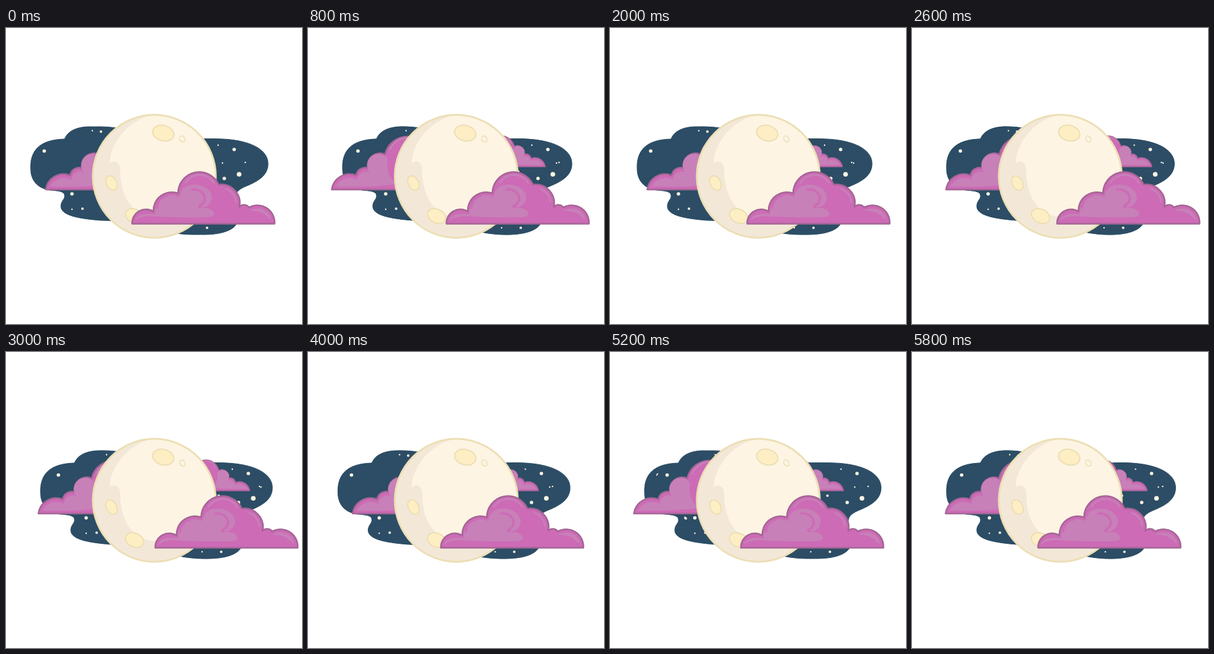
An HTML page that plays this animation: 480x480 px, repeating every 6 s.

```html
<!DOCTYPE html>
<html lang="en">
<head>
<meta charset="utf-8">
<title>Moon and clouds</title>
<style>
  html, body { margin: 0; width: 100%; height: 100%; overflow: hidden; background: #fff; }
  svg { display: block; width: 100%; height: 100%; }
  .night { fill: #2c4d65; stroke: #2c4d65; }
  .cloud { fill: #cd6bb6; stroke: #a46695; stroke-width: 2.6; stroke-linejoin: round; }
  .light { fill: #c780b8; }
  .line { fill: none; stroke: #cd6bb6; stroke-width: 3.5; stroke-linecap: round; }
  .shine { stroke: #c780b8; stroke-width: 3; }
  .stars { fill: none; stroke: #fef4e3; stroke-linecap: round; }
  .crater { fill: #fdeec3; stroke: #ecdfb5; stroke-width: 2; }
</style>
</head>
<body>
<svg viewBox="0 0 480 480">
  <defs>
    <g id="sky">
      <path class="night" d="M40 228C39 200 53 181 95 180C100 167 115 160 136 160C180 160 230 180 309 180C374 177 409 195 409 220C409 239 393 248 377 255C364 260 357 265 356 272C354 290 364 305 359 316C352 330 329 335 304 335C250 335 220 312 154 312C114 309 89 303 89 289C89 280 96 278 95 271C94 264 82 264 72 263C49 260 40 245 40 228Z"/>
      <!-- Zero-length strokes with round caps, one path per size -->
      <g class="stars">
        <path stroke-width="2.4" d="M140 166.500h0M107 294h0M344 190h0M388 218h0M295 324h0"/>
        <path stroke-width="4.200" d="M154 168h0M124 293h0M322 233h0M326 324h0"/>
        <path stroke-width="5.600" d="M62 199.500h0M107 269h0M370 197h0M354 244h0"/>
        <path stroke-width="7.600" d="M378 237.300h0"/>
      </g>
    </g>
    <g id="puff">
      <path class="cloud" d="M.5 262A29 29 0 0 1 40 239A15 15 0 0 1 59 227A20 20 0 0 1 87 205A37 37 0 0 1 160 210V262Z"/>
      <path class="light" d="M7 257A26 26 0 0 1 42 246A14 14 0 0 1 62 234A18 18 0 0 1 91 211Q88 240 106 253Q60 259 7 257Z"/>
      <path class="line shine" d="M95 197A30 30 0 0 1 123 178"/>
    </g>
  </defs>

  <use href="#sky" x="16"/>
  <use href="#sky" id="drift"/>
  <use href="#puff" id="left"/>
  <g id="right">
    <use href="#puff" transform="matrix(-.58 0 0 .58 0 73)"/>
    <path class="stars" stroke-width="2.4" d="M18 219h0"/>
  </g>

  <circle cx="240.5" cy="240.5" r="99.5" fill="#f3e8d8"/>
  <path fill="#fef4e3" d="M230 143C196 153 167 190 168.500 220C172 214 183 214 185 227C185 262 196 307 250 307C278 307 303 296 318 302A99 99 0 0 0 230 142Z"/>
  <g class="crater">
    <ellipse rx="17.5" ry="12.5" transform="translate(255 170.5) rotate(15)"/>
    <ellipse rx="4" ry="5.3" transform="translate(286 180) rotate(-35)" fill="#fef4e3" stroke-width="1.5"/>
    <ellipse rx="8.5" ry="12.5" transform="translate(171 251.5) rotate(-27)"/>
    <ellipse rx="15.5" ry="11" transform="translate(208.5 305) rotate(25)"/>
    <circle cx="240.5" cy="240.5" r="99.7" style="fill:none;stroke-width:3"/>
  </g>

  <g id="front">
    <path class="cloud" d="M.5 317.500A22.500 22.500 0 0 1 35 297.500A30 30 0 0 1 75 268A34.500 34.500 0 0 1 141 254A30 30 0 0 1 174.500 290A10 10 0 0 1 190 291A28 28 0 0 1 231.500 317.500Z"/>
    <path class="light" d="M5 314Q8 298 38 302A27 27 0 0 1 77 274Q80 253 104 254C126 256 135 272 127 284Q119 294 109 289Q110 292 122 292C134 295 141 306 122 307Q70 308 30 305Q10 306 5 314Z"/>
    <path class="line" d="M98 262C117 260 127 280 109 289M41 290Q43 275 57 272M41 291.500h0M110 291h1"/>
    <path class="line shine" d="M87 251A27 27 0 0 1 133 251M153 261A24 24 0 0 1 169 282"/>
    <path class="light" d="M190 296C204 289 223 293 226 311C218 308 219 297 190 296Z"/>
  </g>
</svg>
<script>
  const LOOP = 6000, STEP = 200;

  // Horizontal wander: each layer eases between its places at these seconds
  const times = [0, .8, 1.2, 2, 3, 3.5, 4, 4.8, 5.8];
  const places = {
    drift: [0, 19, 14, 4, 23, 16, 8.5, 37, 18.5],
    left: [64, 38, 25, 60, 52, 36, 72, 30, 54],
    right: [333, 385, 388, 377, 395.5, 390, 374, 377.5, 381.5],
    front: [204, 224, 231, 222, 241.5, 240, 215, 216, 204]
  };
  const ease = u => (1 - Math.cos(Math.PI * u)) / 2;

  function draw(now) {
    const t = Math.floor(now % LOOP / STEP) * STEP / 1000;
    const i = Math.max(1, times.findIndex(end => end >= t));
    const u = ease((t - times[i - 1]) / (times[i] - times[i - 1]));
    for (const [id, xs] of Object.entries(places)) {
      const x = xs[i - 1] + (xs[i] - xs[i - 1]) * u;
      document.getElementById(id).setAttribute('transform', `translate(${x.toFixed(2)})`);
    }
    requestAnimationFrame(draw);
  }
  draw(performance.now());
</script>
</body>
</html>
```
